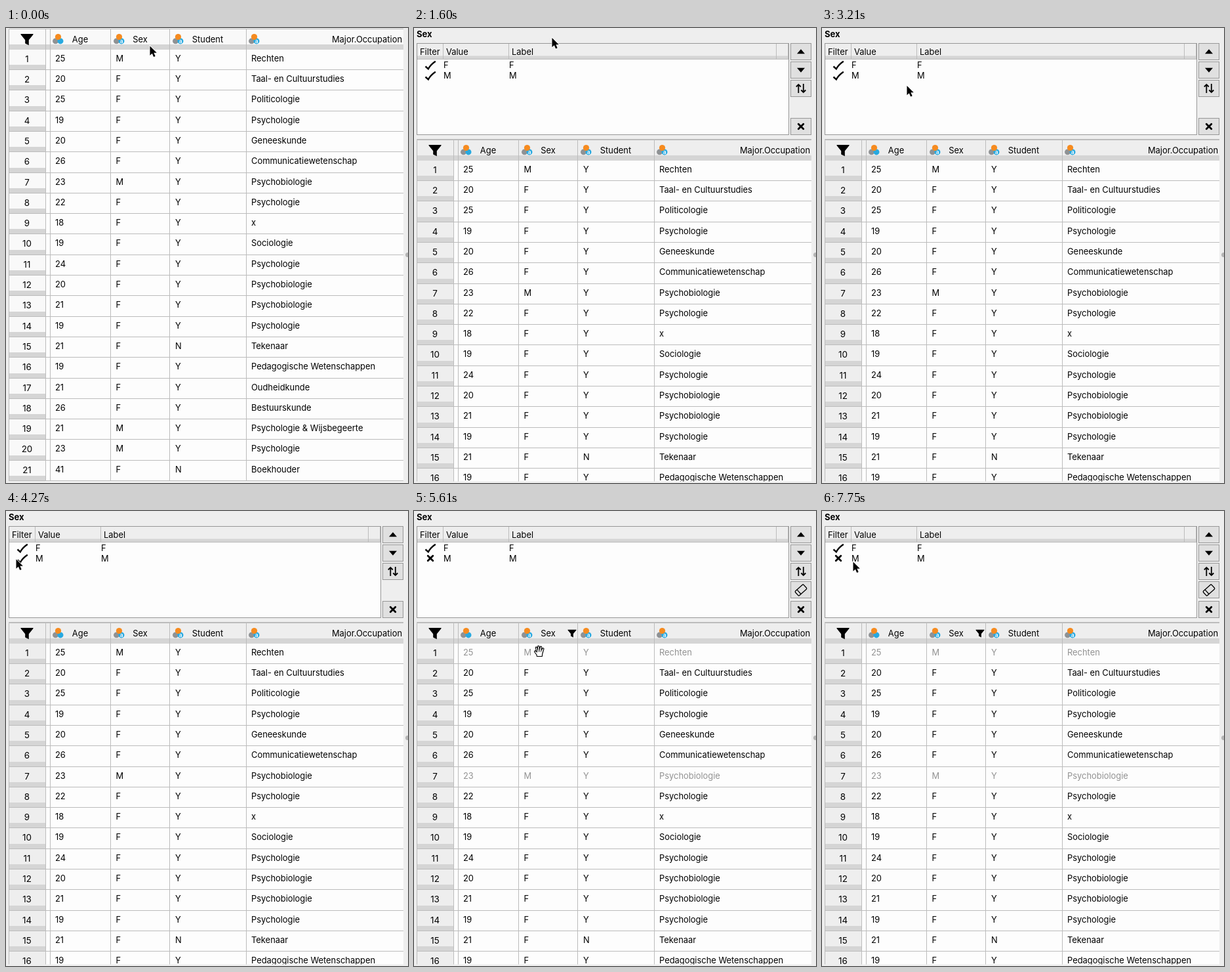
These frames come from a looping animation (613x693 px, 8000 ms). An HTML page:

```html
<!DOCTYPE html>
<html lang="nl">
<head>
<meta charset="utf-8">
<title>Filter by label</title>
<style>
  html, body { margin: 0; width: 100%; height: 100%; overflow: hidden; background: #eee; }
  svg { display: block; width: 613px; height: 693px; font: 12.9px Inter, sans-serif; fill: #000; }
  .line { stroke: #bcbcbc; fill: none; }
  .strip { fill: #d5d5d5; }
  .head { fill: #eee; }
  .light .head { fill: #f9f9f9; }
  .num { font-size: 13.4px; text-anchor: middle; }
  .mid { text-anchor: middle; }
  .off { fill: #929292; }
  .hide { display: none; }
</style>
</head>
<body>
<svg id="stage" viewBox="0 0 613 693">
  <defs>
    <clipPath id="view"><rect x="4" y="1" width="602.5" height="689.5"/></clipPath>
    <path id="funnel" d="M-9.5-8.5H9.5V-7.5L2.8 .8V8.8L-2.8 6V.8L-9.5-7.5Z"/>
    <path id="check" d="M-7.5 1.5L-3.2 5.3Q.5-1.5 7.8-6.2" fill="none" stroke="#000" stroke-width="2.4"/>
    <path id="cross" d="M-3.8-3.8L3.8 3.8M3.8-3.8L-3.8 3.8" fill="none" stroke="#000" stroke-width="2.8" stroke-linecap="round"/>
    <g id="balls">
      <circle cx="-3.5" cy="3.2" r="4.4" fill="#8f9294"/>
      <circle cx="4" cy="3.2" r="4.5" fill="#27a9e0"/>
      <circle cx="0.5" cy="-3.2" r="4.6" fill="#f68b1f"/>
    </g>
  </defs>
  <rect width="613" height="693" fill="#eee"/>
  <circle cx="612.5" cy="345.5" r="3.5" fill="#b5b5b5"/>
  <g clip-path="url(#view)"><g id="table"></g></g>
  <g id="panel"></g>
  <g id="arrow">
    <path d="M0 0V14.2L3.3 11.2L5.7 16.6L8.2 15.5L5.9 10.3H10.3Z" stroke="#fff" stroke-width="1.6" paint-order="stroke"/>
  </g>
  <g id="hand">
    <path d="M-3.5 8L-4 5.5L-7 1.5C-8-.5-6-1.2-4.7.3L-3.7 1.4L-5.6-4.6C-6-6.6-3.8-7-3.2-5.2L-2.2-1.9L-2.5-6.7C-2.4-8.6-.1-8.6.1-6.8L.5-2L1.4-6.3C2-8 4-7.4 3.8-5.6L3.3-1.6L4.8-4.1C5.8-5.4 7.5-4.5 6.8-2.8L4.8 4L4.3 8Z"
      fill="#fff" stroke="#000" stroke-width="1.2" stroke-linejoin="round"/>
    <path d="M-2.2-1.9L-1.6 1M.5-2V1M3.3-1.6L2.6 1.2" fill="none" stroke="#000" stroke-width=".8"/>
  </g>
</svg>
<script>
const LOOP = 8000, PANEL_AT = 1600, FILTER_AT = 4540, DIM_AT = 4800;
const TABLE_SHIFT = 169, ROW = 31.3;

const rows = `25|M|Y|Rechten
20|F|Y|Taal- en Cultuurstudies
25|F|Y|Politicologie
19|F|Y|Psychologie
20|F|Y|Geneeskunde
26|F|Y|Communicatiewetenschap
23|M|Y|Psychobiologie
22|F|Y|Psychologie
18|F|Y|x
19|F|Y|Sociologie
24|F|Y|Psychologie
20|F|Y|Psychobiologie
21|F|Y|Psychobiologie
19|F|Y|Psychologie
21|F|N|Tekenaar
19|F|Y|Pedagogische Wetenschappen
21|F|Y|Oudheidkunde
26|F|Y|Bestuurskunde
21|M|Y|Psychologie & Wijsbegeerte
23|M|Y|Psychologie
41|F|N|Boekhouder`.split("\n").map(line => line.split("|"));

// start time, x, y, pointer shape
const moves = [
  [0, 219.5, 27.5, "arrow"], [260, 213, 23, "arrow"], [530, 210, 18, "arrow"],
  [790, 210.5, 15, "arrow"], [2410, 210.5, 18.5, "arrow"], [2670, 209.5, 42, "arrow"],
  [2940, 189.5, 53, "arrow"], [3210, 129.5, 88, "arrow"], [3470, 76, 89, "arrow"],
  [3740, 27.5, 75.5, "arrow"], [4000, 3.5, 77, "arrow"], [4270, 15.5, 73.5, "arrow"],
  [5340, 184, 297.5, "hand"], [5610, 191, 213.5, "hand"], [6150, 226, 400, "hand"],
  [6420, 222, 401, "hand"], [6680, 224, 414, "hand"], [6950, 193, 307.5, "hand"],
  [7220, 99, 118, "arrow"], [7480, 80, 93, "arrow"], [7750, 47.5, 77.5, "arrow"]
];

const $ = id => document.getElementById(id);
const esc = s => String(s).replace(/&/g, "&amp;");
const text = (x, y, s, cls = "") => `<text x="${x}" y="${y}" class="${cls}">${esc(s)}</text>`;
const rect = (x, y, w, h, attr) => `<rect x="${x}" y="${y}" width="${w}" height="${h}" ${attr}/>`;
const line = d => `<path class="line" d="${d}"/>`;
const use = (id, x, y, scale = 1) => `<use href="#${id}" transform="translate(${x} ${y}) scale(${scale})"/>`;
const rowTop = i => Math.floor(33.2 + i * ROW);

function tableMarkup() {
  const heads = [["Age", 113, 79], ["Sex", 204.5, 172], ["Student", 307.5, 262], ["Major.Occupation", 550.5, 378]];
  const cols = [75, 167.5, 258, 374];
  let out = rect(4, 1, 602, 32, 'class="head"') + rect(4, 25, 602, 8, 'class="strip"')
    + rect(60, 33, 546, 658, 'fill="#fdfdfd"') + use("funnel", 32, 17.5);

  heads.forEach(([name, x, icon], i) => {
    out += text(x, 21.5, name, "mid") + use("balls", icon, 16.7);
    if (i) out += `<text x="${icon + 4.1}" y="22.7" class="mid" style="font-size:8.5px;font-weight:600;fill:#fff">a</text>`;
  });
  out += `<g class="filtered">${use("funnel", 241, 17.5, .68)}</g>`;

  rows.forEach((row, i) => {
    const y = rowTop(i), end = rowTop(i + 1);
    out += rect(4, y, 56, end - y, 'class="head"') + rect(4, end - 8, 56, 7, 'class="strip"')
      + text(32, y + 19, i + 1, "num")
      + `<g class="${row[1] === "M" ? "male" : ""}">`
      + row.map((cell, c) => text(cols[c], y + 18, cell)).join("") + "</g>"
      + line(`M4 ${end - .5}H606`);
  });
  return out + line("M4.5 690V1.5H606M60.5 1V690M67.5 1V690M159.5 1V690M249.5 1V690M366.5 1V690");
}

function panelMarkup() {
  const button = y => rect(574.5, y + .5, 31, 25, 'fill="#e0e0e0" stroke="#979797"');
  const tip = (x, y, dir) => `<path d="M${x - 6} ${y + 3.2 * dir}H${x + 6}L${x} ${y - 3.8 * dir}Z"/>`;
  return `<text x="4" y="14" style="font-size:13px;font-weight:700">Sex</text>`
    + rect(4.5, 23.5, 567, 139, 'fill="#fdfdfd" stroke="#979797"')
    + rect(5, 24, 566, 23.5, 'fill="#eee"') + rect(5, 42.5, 566, 5, 'class="strip"')
    + line("M44.5 24V47M144.5 24V47M552.5 24V47M570.5 24V47M5 47.5H571M4 169.5H606")
    + text(9, 40.5, "Filter") + text(49, 40.5, "Value") + text(149, 40.5, "Label")
    + text(45, 60.7, "F") + text(145, 60.7, "F") + text(45, 76.7, "M") + text(145, 76.7, "M")
    + use("check", 25, 57)
    + `<g class="plain">${use("check", 25, 73)}</g><g class="filtered">${use("cross", 25, 72)}</g>`
    + [23, 51, 79, 137].map(button).join("")
    + tip(590, 36, 1) + tip(590, 64, -1)
    + `<path d="M586.3 99V86M582.8 89.5L586.3 86L589.8 89.5M593.8 85V98M590.3 94.5L593.8 98L597.3 94.5" fill="none" stroke="#000" stroke-width="1.8"/>`
    + use("cross", 590, 150)
    + `<g class="filtered">${button(107)}<g transform="translate(590 120.5) rotate(-42)" fill="none" stroke="#000" stroke-width="1.3">`
    + `<rect x="-8.5" y="-4.5" width="17" height="9" rx="1.5"/><path d="M-4-4.5V4.5"/></g></g>`;
}

$("table").innerHTML = tableMarkup();
$("panel").innerHTML = panelMarkup();

const all = sel => [...document.querySelectorAll(sel)];
const filtered = all(".filtered"), plain = all(".plain"), males = all(".male");
const show = (el, on) => el.classList.toggle("hide", !on);

function render(t) {
  const open = t >= PANEL_AT, on = t >= FILTER_AT;
  $("table").setAttribute("transform", `translate(0 ${open ? TABLE_SHIFT : 0})`);
  $("table").classList.toggle("light", !open);
  show($("panel"), open);
  filtered.forEach(el => show(el, on));
  plain.forEach(el => show(el, !on));
  males.forEach(el => el.classList.toggle("off", t >= DIM_AT));

  const [, x, y, shape] = moves.findLast(m => m[0] <= t);
  for (const id of ["arrow", "hand"]) show($(id), id === shape);
  $(shape).setAttribute("transform", `translate(${x} ${y})`);
}

const start = performance.now();
function tick() {
  render((performance.now() - start) % LOOP);
  requestAnimationFrame(tick);
}
tick();
</script>
</body>
</html>
```
